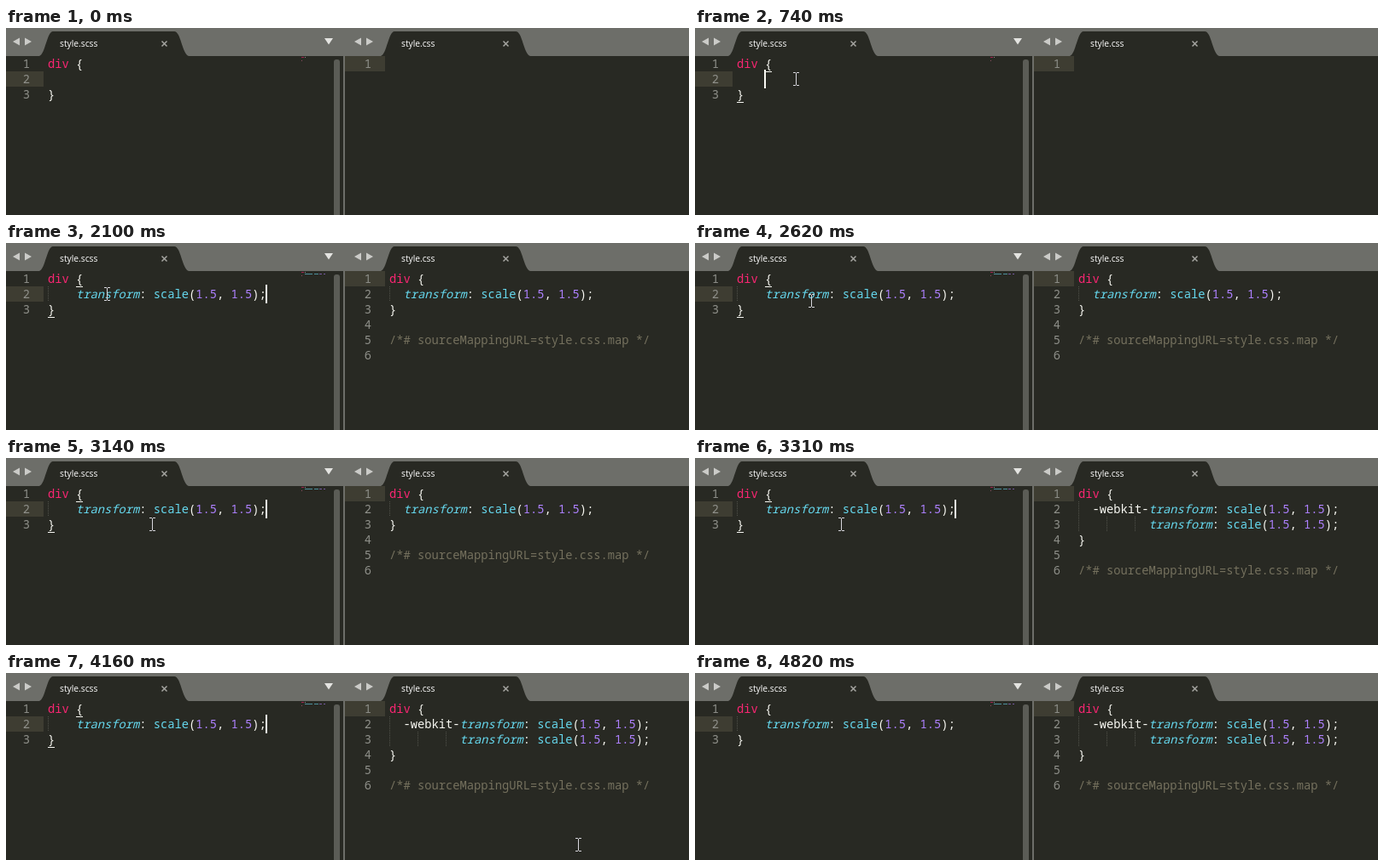
An HTML page with a canvas that plays this animation: 800x220 px, repeating every 4.89 s.

```html
<!DOCTYPE html>
<html lang="en">
<head>
<meta charset="utf-8">
<title>Editor</title>
<style>
html, body { margin: 0; width: 100%; height: 100%; overflow: hidden; background: #282923; }
canvas { display: block; }
</style>
</head>
<body>
<canvas id="stage" width="800" height="220"></canvas>
<script>
const ctx = document.getElementById('stage').getContext('2d');
const LOOP = 4890, COL = 8.25, ROW = 18, PANE = 400;
const CODE = '13.75px "Noto Sans Mono", monospace';
const UI = '10.25px "Open Sans", sans-serif';
const BAR = '#6d6e69', BG = '#282923', WHITE = '#f8f8f2', PINK = '#f92672',
      CYAN = '#66d9ef', PURPLE = '#ae81ff', COMMENT = '#75715e';

const EVENT = { click: 740, paste: 1140, save: 1550, compile: 2040, prefix: 3310, blur: 4820 };

// time, opacity
const BLINK = [[740, 1], [1610, .5], [1710, 0], [2040, .5], [2100, 1], [2560, .5], [2620, 0],
  [3080, .5], [3140, 1], [3580, .5], [3640, 0], [4090, .5], [4150, 1], [4440, .5], [4500, 0]];

const linear = f => f;
const easeIn = f => f ** 1.5;
const easeOut = f => 1 - (1 - f) ** 2;
const smooth = f => f * f * (3 - 2 * f);

// The pointer advances in discrete steps from one rest position to the next.
const START = { x: 697, y: 236 };
const MOVES = [
  { start: 110, end: 580, steps: 9, x: 123, y: 58, ease: easeOut },
  { start: 640, end: 640, steps: 1, x: 118, y: 60, ease: linear },
  { start: 2270, end: 2270, steps: 1, x: 114, y: 61, ease: linear },
  { start: 2450, end: 2850, steps: 7, x: 171, y: 78, ease: smooth },
  { start: 3470, end: 3750, steps: 6, x: 372, y: 119, ease: easeIn },
  { start: 3810, end: 3980, steps: 4, x: 560, y: 168, ease: linear },
  { start: 4030, end: 4260, steps: 5, x: 743, y: 224, ease: linear }
];

const scale = [[': ', WHITE], ['scale', CYAN], ['(', WHITE], ['1.5', PURPLE],
  [', ', WHITE], ['1.5', PURPLE], [');', WHITE]];
const declaration = (indent, prefix = '') =>
  [[' '.repeat(indent) + prefix, WHITE], ['transform', CYAN, true], ...scale];
const OPEN = [['div', PINK], [' {', WHITE]];
const CLOSE = [['}', WHITE]];
const FOOTER = [[], [['/*# sourceMappingURL=style.css.map */', COMMENT]]];

function rect(x, y, w, h, color) {
  ctx.fillStyle = color;
  ctx.fillRect(x, y, w, h);
}

function polygon(color, ...points) {
  ctx.fillStyle = color;
  ctx.beginPath();
  points.forEach(([x, y]) => ctx.lineTo(x, y));
  ctx.closePath();
  ctx.fill();
}

function text(string, x, y, color, font) {
  ctx.font = font;
  ctx.fillStyle = color;
  ctx.fillText(string, x, y);
}

function codeLine(segments, x, y) {
  for (const [string, color, italic] of segments) {
    text(string, x, y, color, (italic ? 'italic ' : '') + CODE);
    x += string.length * COL;
  }
}

function tab(x, name, dirty) {
  polygon('#cbcbc8', [x + 8, 16], [x + 16, 11.5], [x + 16, 20.5]);
  polygon('#cbcbc8', [x + 30, 16], [x + 22, 11.5], [x + 22, 20.5]);
  ctx.fillStyle = BG;
  ctx.beginPath();
  ctx.moveTo(x + 39, 33);
  ctx.bezierCurveTo(x + 46, 31, x + 48, 4, x + 55, 4);
  ctx.lineTo(x + 197, 4);
  ctx.bezierCurveTo(x + 205, 4, x + 206, 30, x + 214, 33);
  ctx.fill();
  text(name, x + 63, 22, '#ffffff', UI);

  ctx.strokeStyle = ctx.fillStyle = '#a5a5a1';
  ctx.lineWidth = 1.5;
  ctx.beginPath();
  if (dirty) {
    ctx.arc(x + 185.5, 18.5, 3.5, 0, Math.PI * 2);
    ctx.fill();
  } else {
    ctx.moveTo(x + 182.5, 15.5);
    ctx.lineTo(x + 188.5, 21.5);
    ctx.moveTo(x + 188.5, 15.5);
    ctx.lineTo(x + 182.5, 21.5);
    ctx.stroke();
  }
}

function lines(x, list, active) {
  const gutter = x ? x - 3 : 0;
  rect(gutter, 33 + active * ROW, x + 44 - gutter, ROW, '#3e3d32');
  list.forEach((segments, i) => {
    const y = 47 + i * ROW;
    text(String(i + 1), x + 19.75, y, '#8f908a', CODE);
    codeLine(segments, x + 49, y);
  });
}

function guide(x, row) {
  for (let y = 0; y < ROW; y += 2) rect(x, 33 + row * ROW + y, 1, 1, '#50514a');
}

function minimap(pasted) {
  rect(346, 34, 3, 1, '#a02650');
  rect(350, 34, 1, 1, '#8a8a85');
  rect(346, 38, 1, 1, '#8a5060');
  if (!pasted) return;
  rect(350, 36, 9, 1, '#4c909d');
  rect(361, 36, 5, 1, '#4c909d');
  rect(367, 36, 3, 1, '#74599f');
  rect(372, 36, 2, 1, '#74599f');
}

function leftPane(t) {
  const pasted = t >= EVENT.paste;
  tab(0, 'style.scss', pasted && t < EVENT.save);
  polygon('#e4e4e1', [373, 12], [383, 12], [378, 19.5]);
  lines(0, [OPEN, pasted ? declaration(4) : [], CLOSE], 1);
  if (pasted) guide(49, 1);
  minimap(pasted);
  if (t >= EVENT.click && t < EVENT.blur) {
    rect(82, 51, 8, 1, WHITE);
    rect(49, 87, 8, 1, WHITE);
  }
  ctx.fillStyle = '#5b5c56';
  ctx.beginPath();
  ctx.roundRect(384, 37, 7, 190, 3);
  ctx.fill();
}

function rightPane(t) {
  tab(PANE, 'style.css', false);
  if (t < EVENT.compile) {
    lines(PANE, [[]], 0);
  } else if (t < EVENT.prefix) {
    lines(PANE, [OPEN, declaration(2), CLOSE, ...FOOTER, []], 0);
    guide(449, 1);
  } else {
    lines(PANE, [OPEN, declaration(2, '-webkit-'), declaration(10), CLOSE, ...FOOTER], 0);
    guide(449, 1);
    [449, 482, 515].forEach(x => guide(x, 2));
  }
}

function caret(t) {
  const phase = BLINK.filter(([time]) => t >= time).pop();
  if (!phase) return;
  ctx.globalAlpha = phase[1];
  rect(t < EVENT.paste ? 81 : 304, 49, 2, 22, WHITE);
  ctx.globalAlpha = 1;
}

function pointerAt(t) {
  let { x, y } = START;
  for (const m of MOVES) {
    if (t < m.start) break;
    const progress = m.end > m.start ? (t - m.start) / (m.end - m.start) : 1;
    const step = Math.floor(Math.min(progress, 1) * (m.steps - 1) + 1e-6);
    const f = m.ease((step + 1) / m.steps);
    x += (m.x - x) * f;
    y += (m.y - y) * f;
  }
  return [Math.round(x), Math.round(y)];
}

function pointer(t) {
  if (t < MOVES[0].start || t >= MOVES[MOVES.length - 1].end) return;
  const [x, y] = pointerAt(t);
  if (x > 343 && x < 398) {
    const shape = [[0, 0], [0, 16], [3.7, 12.6], [6.2, 18.3], [8.6, 17.2], [6.2, 11.7], [11, 11.7]];
    polygon('#ffffff', ...shape.map(([dx, dy]) => [x + dx + .5, y + dy + .5]));
    ctx.strokeStyle = '#111111';
    ctx.lineWidth = 1;
    ctx.stroke();
    return;
  }
  const color = '#d8d7dd';
  rect(x, y - 7, 1, 14, color);
  for (const edge of [y - 8, y + 7]) {
    rect(x - 3, edge, 3, 1, color);
    rect(x + 1, edge, 3, 1, color);
  }
}

function draw(t) {
  rect(0, 0, 800, 220, BG);
  rect(0, 0, 800, 33, BAR);
  rect(395, 33, 2, 187, BAR);
  leftPane(t);
  rightPane(t);
  caret(t);
  pointer(t);
}

const origin = performance.now();
function tick() {
  draw((performance.now() - origin) % LOOP);
  requestAnimationFrame(tick);
}
tick();
</script>
</body>
</html>
```
